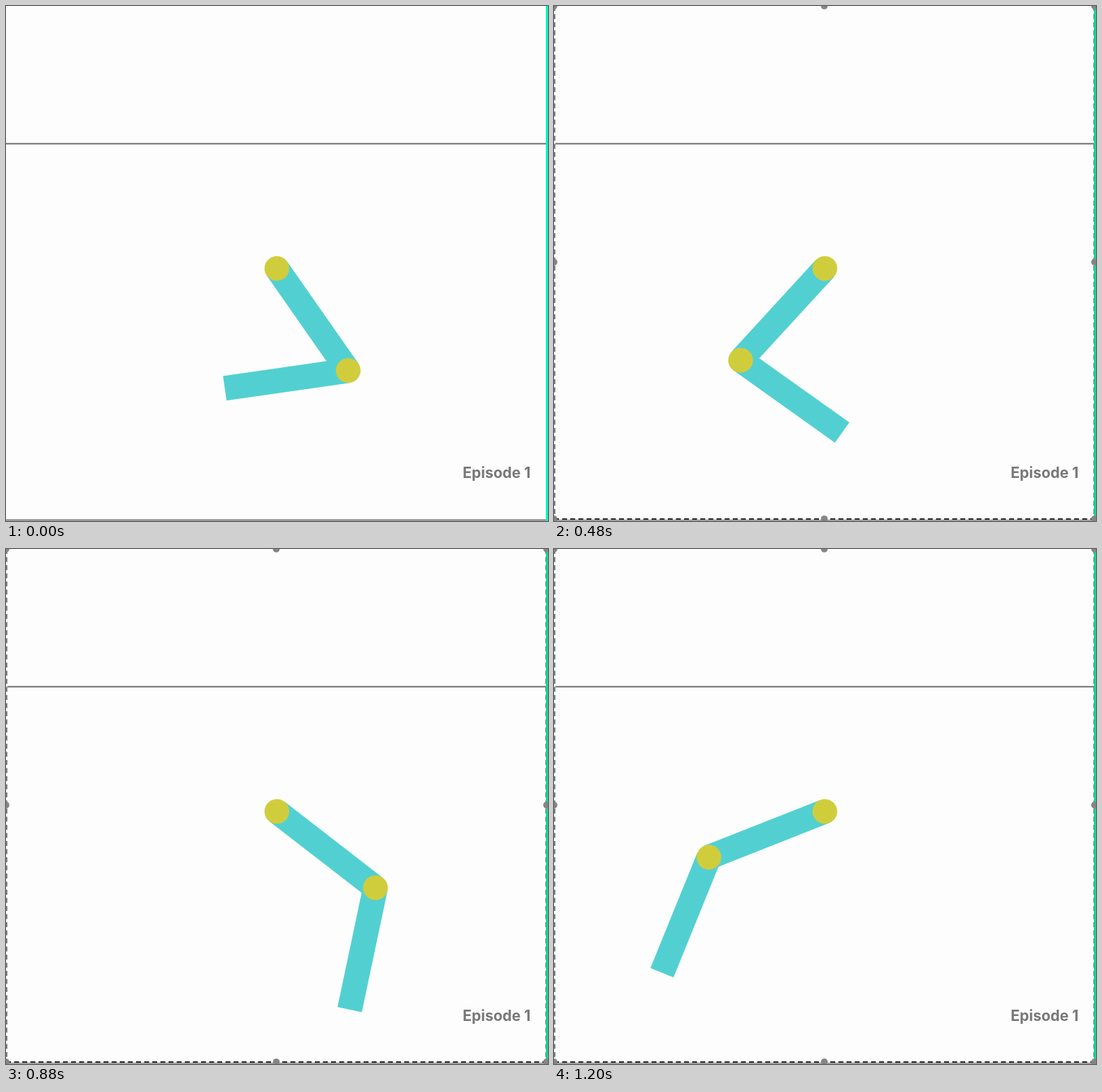
These frames come from a looping animation (767x730 px, 1.28 s). An HTML page:

```html
<!DOCTYPE html>
<html lang="en">
<head>
<meta charset="utf-8">
<title>Two-link pendulum</title>
<style>
  html, body { margin: 0; width: 100%; height: 100%; overflow: hidden; background: #fdfdfd; }
  svg { display: block; width: 767px; height: 730px; }
  .link { fill: #52d0d1; }
  .joint { fill: #d0cd3d; }
  .rule { fill: #858585; }
  text { font: 700 21px Inter, Roboto, sans-serif; fill: #777; }
</style>
</head>
<body>
<svg viewBox="0 0 767 730">
  <rect width="767" height="730" fill="#fdfdfd"/>
  <rect class="rule" y="194" width="764" height="2.4"/>
  <rect class="rule" y="727.5" width="765" height="2.2"/>
  <rect id="edge" x="764" width="3" height="730" fill="#00f7c4"/>
  <g id="selection" fill="none" stroke-width="2">
    <path d="M1 0V727M0 727.3H765" stroke="#fdfdfd"/>
    <path d="M1 0V727" stroke="#808080" stroke-dasharray="7 4.5"/>
    <path d="M764 0V727" stroke="#6f8f84" stroke-width="1.6" stroke-dasharray="7 4.5"/>
    <path d="M0 727.3H765" stroke="#1c1c1c" stroke-dasharray="7 4.5"/>
    <g id="handles" fill="#858585"></g>
  </g>
  <text x="646.3" y="669">Episode 1</text>
  <g id="upper">
    <rect class="link" x="-17.6" width="35.2" height="176.5"/>
    <circle class="joint" r="17.5"/>
  </g>
  <g id="lower">
    <rect class="link" x="-17.6" width="35.2" height="176.5"/>
    <circle class="joint" r="17.5"/>
  </g>
</svg>
<script>
const STEP = 80, LOOP = 1280, HOLD = 3;
const LENGTH = 176.5, PIVOT = { x: 383.3, y: 372 };

// Each arm's angle from straight down, in degrees, positive to the right.
const swing = [
  [34.9, -81.8], [29, -46], [-11, 9], [-42.5, 54.5], [-40, 81],
  [-14, 89], [20.6, 71.8], [45, 31.5], [52.2, -11.9], [28.5, -44],
  [-21.2, -48.6], [-63, -33], [-68.4, -22.1]
];

const el = id => document.getElementById(id);

for (const x of [0, 382.5, 765])
  for (const y of [0, 363, 727]) {
    if (x === 382.5 && y === 363) continue;
    const dot = document.createElementNS("http://www.w3.org/2000/svg", "circle");
    dot.setAttribute("cx", x);
    dot.setAttribute("cy", y);
    dot.setAttribute("r", 4.8);
    el("handles").append(dot);
  }

function place(id, x, y, angle) {
  el(id).setAttribute("transform", `translate(${x} ${y}) rotate(${-angle})`);
}

function draw(ms) {
  const step = Math.floor((ms % LOOP) / STEP);
  const [upper, lower] = swing[Math.max(0, step - HOLD)];
  const rad = upper * Math.PI / 180;
  place("upper", PIVOT.x, PIVOT.y, upper);
  place("lower", PIVOT.x + LENGTH * Math.sin(rad), PIVOT.y + LENGTH * Math.cos(rad), lower);

  const selected = step > HOLD;
  el("selection").style.display = selected ? "" : "none";
  el("edge").setAttribute("fill", selected ? "#00e09a" : "#00f7c4");
}

const start = performance.now();
function tick() {
  draw(performance.now() - start);
  requestAnimationFrame(tick);
}
draw(0);
requestAnimationFrame(tick);
</script>
</body>
</html>
```
